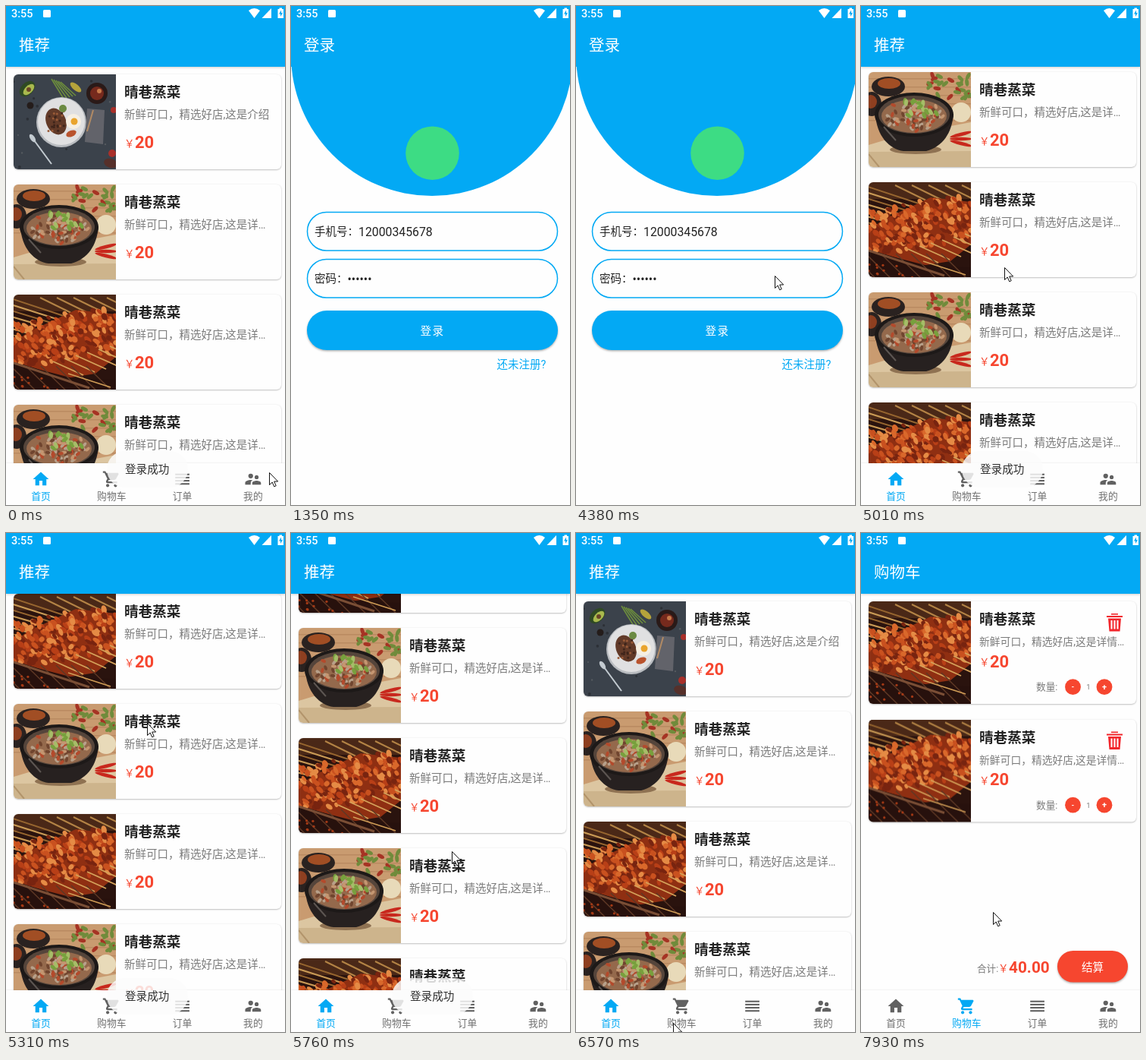
Animation of 368 by 657 pixels, one loop 8000 ms. Source, as an HTML page with a canvas:

```html
<!DOCTYPE html>
<html lang="zh-CN">
<head>
<meta charset="utf-8">
<title>点餐</title>
<style>
html, body { margin: 0; width: 100%; height: 100%; overflow: hidden; background: #fefefe; }
canvas { display: block; width: 100vw; height: 100vh; }
</style>
</head>
<body>
<canvas id="stage"></canvas>
<script>
const W = 368, H = 657, LOOP = 8000;
const BLUE = '#03a9f4', RED = '#f6462f', INK = '#222', GRAY = '#7b7b7b', PAPER = '#fefefe';
const FONT = 'Roboto, "Noto Sans CJK SC", "Noto Sans CJK", sans-serif';
const SHOP = '晴巷蒸菜', PHONE = '12000345678';
const TAU = Math.PI * 2;
const dpr = window.devicePixelRatio || 1;

function makeCanvas(w, h, el = document.createElement('canvas')) {
  el.width = Math.round(w * dpr);
  el.height = Math.round(h * dpr);
  const c = el.getContext('2d');
  c.scale(dpr, dpr);
  return c;
}

const screen = makeCanvas(W, H, document.getElementById('stage'));
const layer = makeCanvas(W, H);
let g = screen;

// ---------- drawing helpers ----------
function rect(x, y, w, h, color) {
  g.fillStyle = color;
  g.fillRect(x, y, w, h);
}

function oval(x, y, rx, ry, color, turn = 0) {
  g.fillStyle = color;
  g.beginPath();
  g.ellipse(x, y, rx, ry, turn, 0, TAU);
  g.fill();
}

const disc = (x, y, r, color) => oval(x, y, r, r, color);

function line(x1, y1, x2, y2, color, width) {
  g.strokeStyle = color;
  g.lineWidth = width;
  g.beginPath();
  g.moveTo(x1, y1);
  g.lineTo(x2, y2);
  g.stroke();
}

function shape(d, color) {
  g.fillStyle = color;
  g.fill(new Path2D(d));
}

function roundPath(x, y, w, h, r) {
  g.beginPath();
  g.roundRect(x, y, w, h, r);
}

function shadowed(alpha, blur, dy, draw) {
  g.save();
  g.shadowColor = `rgba(0,0,0,${alpha})`;
  g.shadowBlur = blur * dpr;
  g.shadowOffsetY = dy * dpr;
  draw();
  g.restore();
}

// y is the visual middle of the line
function text(s, x, y, size, color, { weight = 400, align = 'left', gap = 0 } = {}) {
  g.font = `${weight} ${size}px ${FONT}`;
  g.textAlign = align;
  g.letterSpacing = gap + 'px';
  g.fillStyle = color;
  g.fillText(s, x, y + size * 0.37);
  g.letterSpacing = '0px';
}

function seeded(seed) {
  return () => (seed = (seed * 16807) % 2147483647) / 2147483647;
}

function scatter(n, seed, draw) {
  const rnd = seeded(seed);
  for (let i = 0; i < n; i++) draw(rnd, i);
}

// ---------- dish pictures ----------
function paintPlate() {
  rect(0, 0, 135, 125, '#3b424b');
  scatter(18, 31, r => disc(r() * 135, r() * 125, 1 + r(), r() < 0.5 ? '#2c3036' : '#565b60'));
  oval(18, 19, 8, 12, '#2f4a23', 0.8);
  oval(20, 20, 5, 9, '#a9b94e', 0.8);
  disc(20, 20, 3, '#6a4527');
  disc(22, 41, 4.5, '#241c1a');
  for (let i = 0; i < 5; i++) line(50 + i * 3, 6 + i, 66 + i * 4, 32 - i, '#6d8e3d', 1.6);
  oval(82, 17, 9, 4, '#b5a33b', 0.7);
  disc(110, 25, 14, '#2a1a18');
  disc(110, 25, 9, '#762a1d');
  disc(113, 22, 3, '#c77a4a');
  disc(63, 63, 33, '#b9bcc0');
  disc(63, 62, 31, '#e0e0e1');
  oval(56, 62, 13, 18, '#623a28', -0.4);
  scatter(22, 7, r => disc(46 + r() * 22, 47 + r() * 30, 1.5, r() < 0.5 ? '#9a5b38' : '#3f251b'));
  disc(65, 45, 5, '#6b8a42');
  disc(79, 62, 10, '#f6efe2');
  disc(80, 62, 4.5, '#e9a42d');
  oval(76, 78, 7, 4, '#b9532d', -0.4);
  shape('M97 45L120 47 118 92 94 89Z', '#62636a');
  line(105, 47, 97, 75, '#b18a64', 2);
  line(22, 80, 50, 118, '#c3cbd1', 2);
  oval(25, 84, 3, 6, '#c3cbd1', -0.6);
  disc(132, 47, 4, '#a9302a');
  disc(130, 104, 5, '#a9302a');
  oval(128, 117, 9, 6, '#56302a', 0.3);
}

function paintBowl() {
  rect(0, 0, 135, 125, '#c99b70');
  for (let i = 0; i < 6; i++) rect(0, 8 + i * 11, 135, 1.5, '#b98a61');
  shape('M0 96L40 84 135 66V125H0Z', '#dcc6a1');
  shape('M0 105L135 104V125H0Z', '#cdb48c');
  line(14, 125, 0, 108, '#b2946b', 2);
  oval(26, 19, 22, 13, '#2a2220');
  oval(27, 15, 15, 7, '#a14e24');
  oval(4, 42, 13, 16, '#2a2220');
  oval(3, 39, 8, 9, '#8e3f20');
  scatter(26, 19, r => oval(80 + r() * 55, 4 + r() * 30, 5, 2.5, r() < 0.7 ? '#708b3b' : '#a63324', r() * 3));
  disc(122, 53, 13, '#e8dab9');
  for (let i = 0; i < 3; i++) oval(122, 82 + i * 6, 15, 2.2, '#c8281d', -0.25 + i * 0.25);
  oval(62, 102, 34, 6, '#8f7252');
  shape('M9 55C10 84 28 102 46 104H76C98 98 110 80 112 55Z', '#272120');
  oval(60, 56, 52, 29, '#1d1918');
  oval(60, 56, 47, 25, '#55453b');
  oval(60, 58, 43, 22, '#94694c');
  scatter(75, 5, r => {
    const a = r() * TAU, d = Math.sqrt(r());
    const color = ['#c49671', '#70452f', '#b34a2c', '#b7a08a'][Math.floor(r() * 4)];
    oval(60 + Math.cos(a) * d * 40, 58 + Math.sin(a) * d * 20, 3.5, 2, color, r() * 3);
  });
  scatter(16, 23, r => oval(48 + r() * 42, 38 + r() * 24, 4.5, 2.5, r() < 0.7 ? '#78a03d' : '#a6bd68', r() * 3));
  line(20, 72, 36, 90, '#5d5652', 2);
}

function paintSkewers() {
  rect(0, 0, 135, 135, '#2a130e');
  rect(0, 0, 135, 22, '#4a2817');
  for (let i = 0; i < 11; i++) {
    line(-10, 3 + i * 8, 66, 28 + i * 7, i % 2 ? '#c99a55' : '#96652f', 2);
  }
  for (let i = 0; i < 5; i++) line(35 + i * 22, 4, 80 + i * 22, 26, '#b38345', 2);
  shape('M18 50L82 20 135 26V82L108 104 70 110 0 88V64Z', '#8f2f12');
  scatter(210, 11, r => {
    const x = r() * 135, y = 60 - x * 0.16 + (r() - 0.5) * 60 + 7;
    const color = ['#d9682b', '#b83f17', '#e58b45', '#782410', '#c9511f'][Math.floor(r() * 5)];
    oval(x, y, 3 + r() * 3, 2 + r() * 2, color, 0.4 + r());
  });
  for (let i = 0; i < 6; i++) line(52 + i * 15, 88 - i * 4, 92 + i * 15, 106 - i * 4, '#d4a25a', 1.8);
  shape('M0 90L78 110 135 112V135H0Z', '#27110d');
  for (let i = 0; i < 7; i++) line(i * 20 - 24, 94, i * 20 + 18, 135, '#5e3825', 1.5);
  line(0, 90, 100, 123, '#7a4e35', 3);
  scatter(14, 3, r => disc(r() * 75, 108 + r() * 22, 1.6, '#a53a16'));
  line(72, 104, 128, 122, '#cf9c56', 1.8);
}

function picture(paint) {
  g = makeCanvas(135, 135);
  paint();
  const made = g.canvas;
  g = screen;
  return made;
}

const plate = picture(paintPlate), bowl = picture(paintBowl), skewers = picture(paintSkewers);

// ---------- shared parts ----------
function header(title, x = 17) {
  rect(0, 0, W, 80, BLUE);
  text('3:55', 7, 10, 14.5, '#fff', { weight: 500 });
  roundPath(49, 5, 10, 10, 1.5);
  g.fill();
  shape('M320 6Q327.500 0 335 6L327.500 16Z', '#fff');
  shape('M350 3V16H337.500Z', '#fff');
  shape('M358.500 4H360.500V2.500H364V4H366V16H358.500Z', '#fff');
  shape('M363 5.500L360 10.500H362V14L365 9H363Z', BLUE);
  text(title, x, 51, 20.5, '#fff');
}

const tabs = [
  ['首页', c => shape('M10 20v-6h4v6h5v-8h3L12 3 2 12h3v8z', c)],
  ['购物车', c => {
    shape('M1 2v2h2l3.6 7.6-1.4 2.4q-1 3 1.8 3h12v-2H7.4l1-2h7.200l1.800-1L21 5.400 20 4H5.200l-1-2z', c);
    disc(7, 20, 2, c);
    disc(17, 20, 2, c);
  }],
  ['订单', c => { for (let i = 0; i < 4; i++) rect(3, 5 + i * 4, 18, 2, c); }],
  ['我的', c => {
    disc(9, 8, 3, c);
    disc(16.5, 9.5, 2.5, c);
    shape('M9 13c-2.300 0-7 1.200-7 3.500V19h7v-2.200q0-2.200 2.400-3.500Q10 13 9 13z', c);
    shape('M16.500 14c-1.800 0-5.500.9-5.500 2.700V19h11v-2.300c0-1.800-3.700-2.700-5.500-2.700z', c);
  }]
];

function navBar(active) {
  shadowed(0.12, 2, -0.5, () => rect(0, 602, W, 55, PAPER));
  tabs.forEach(([label, icon], i) => {
    const x = 46 + i * 93.3, color = i === active ? BLUE : '#616161';
    g.save();
    g.translate(x - 12.5, 610.5);
    g.scale(1.04, 1.04);
    icon(color);
    g.restore();
    text(label, x, 645, 12.8, i === active ? BLUE : '#707070', { align: 'center' });
  });
}

function card(y, h, pic) {
  shadowed(0.3, 2, 0.8, () => {
    g.fillStyle = PAPER;
    roundPath(10, y, 353, h, 6);
    g.fill();
  });
  g.save();
  roundPath(10, y, 353, h, 6);
  g.clip();
  g.drawImage(pic, 10, y, 135, 135);
  g.restore();
  text(SHOP, 156, y + 23.5, 18.6, INK, { weight: 700 });
}

function price(y, value, x = 156, size = 22) {
  text('￥', x, y + 2, 13.5, RED);
  text(value, x + 14, y, size, RED, { weight: 700 });
}

function toast(alpha) {
  if (alpha <= 0) return;
  g.save();
  g.globalAlpha = alpha;
  g.fillStyle = 'rgba(252,252,252,.83)';
  roundPath(133, 586, 107, 48, 24);
  g.fill();
  text('登录成功', 157, 610, 14.6, '#303030');
  g.restore();
}

// ---------- pages ----------
function home(t) {
  const scroll = track(scrollKeys, t)[0];
  rect(0, 0, W, H, PAPER);
  for (let i = 0; i < 9; i++) {
    const y = 90 + i * 145 - scroll;
    if (y < -60 || y > 610) continue;
    card(y, 125, i === 0 ? plate : i % 2 ? bowl : skewers);
    text('新鲜可口，精选好店,这是' + (i ? '详…' : '介绍'), 156, y + 53, 14.5, GRAY);
    price(y + 89, '20');
  }
  shadowed(0.2, 3, 1, () => rect(0, 0, W, 80, BLUE));
  header('推荐');
  navBar(0);
  toast(t < 4000 ? 1 : 1 - ramp(t, 6050, 6250));
}

function field(y, label, hint, value) {
  g.strokeStyle = BLUE;
  g.lineWidth = 1.5;
  roundPath(21.5, y + 0.5, 330, 50.5, 25.2);
  g.stroke();
  text(label, 31, y + 26, 14.5, INK);
  text(value || hint, 31 + label.length * 14.5, y + 26, 15.8, value ? INK : '#a2a2a2');
}

function pill(x, y, w, h, color, label, opts) {
  shadowed(0.3, 2.5, 1.5, () => {
    g.fillStyle = color;
    roundPath(x, y, w, h, h / 2);
    g.fill();
  });
  text(label, x + w / 2, y + h / 2 + 0.5, 14.6, '#fff', { align: 'center', ...opts });
}

function account(title, x) {
  rect(0, 0, W, H, PAPER);
  disc(186, 64, 186, BLUE);
  header(title, x);
  disc(186.5, 193.7, 35.3, '#3ddc84');
}

function login() {
  account('登录');
  field(271, '手机号：', '', PHONE);
  field(333, '密码：', '', '••••••');
  pill(21, 401, 331, 52, BLUE, '登录', { gap: 1.3 });
  text('还未注册?', 271.5, 472, 14.5, BLUE);
}

function register() {
  account('手机号注册', 75.5);
  line(19, 50.5, 36, 50.5, '#fff', 1.4);
  line(27.5, 42.5, 19.5, 50.5, '#fff', 1.4);
  line(19.5, 50.5, 27.5, 58.5, '#fff', 1.4);
  field(271, '手机号：', '请输入手机号');
  field(333, '密码：', '请输入密码');
  field(395, '确认密码：', '请输入确认密码');
  pill(21, 463, 331, 52, BLUE, '注册', { gap: 1.3 });
}

function trash(x, y) {
  const red = '#f2262c';
  rect(x + 6, y, 9, 1.6, red);
  rect(x, y + 3, 21, 2, red);
  shape(`M${x + 2} ${y + 6.5}h17l-1.500 17h-14z`, red);
  for (let i = 0; i < 3; i++) rect(x + 5.5 + i * 4, y + 9, 2, 11.5, '#fff');
}

function cart() {
  rect(0, 0, W, H, PAPER);
  shadowed(0.2, 3, 1, () => rect(0, 0, W, 80, BLUE));
  header('购物车');
  for (const y of [90, 245.5]) {
    card(y, 135, skewers);
    trash(324, y + 16);
    text('新鲜可口，精选好店,这是详情…', 156, y + 53, 13.8, GRAY);
    price(y + 78.5, '20');
    text('数量:', 231, y + 112.5, 12.7, GRAY);
    disc(279.5, y + 112.7, 10.4, RED);
    disc(321, y + 112.7, 10.4, RED);
    text('-', 279.5, y + 112.5, 10, '#fff', { weight: 500, align: 'center' });
    text('1', 300, y + 112.5, 9.5, GRAY, { align: 'center' });
    text('+', 321, y + 112.5, 11, '#fff', { weight: 700, align: 'center' });
  }
  text('合计:', 153, 573.5, 12.6, GRAY);
  price(571, '40.00', 181, 20.8);
  pill(259, 550, 93, 41.5, RED, '结算', { weight: 500 });
  navBar(1);
}

function pointer(x, y) {
  g.save();
  g.translate(x + 0.5, y + 0.5);
  g.beginPath();
  const tip = new Path2D('M0 0V16L3.700 12.500 6.200 18.300 8.700 17.200 6.200 11.500H11.200Z');
  g.fillStyle = '#fff';
  g.fill(tip);
  g.strokeStyle = '#111';
  g.lineWidth = 1;
  g.stroke(tip);
  g.restore();
}

// ---------- timing ----------
const ramp = (t, a, b) => Math.min(1, Math.max(0, (t - a) / (b - a)));

// keys: [time, ...values], eased between neighbours
function track(keys, t) {
  let i = 0;
  while (i < keys.length - 2 && t >= keys[i + 1][0]) i++;
  const [a, b] = [keys[i], keys[i + 1]];
  const k = ramp(t, a[0], b[0]), e = k * k * (3 - 2 * k);
  return a.slice(1).map((v, n) => v + (b[n + 1] - v) * e);
}

const scrollKeys = [
  [4840, 0], [5010, 148], [5159, 148], [5160, 300], [5310, 300], [5500, 519],
  [5760, 400], [5910, 400], [6270, 0]
];

const pointerKeys = [
  [1780, 340, 430], [2050, 305, 473], [2300, 305, 473], [2800, 35, 41], [3150, 35, 41],
  [3980, 290, 335], [4260, 290, 335], [4380, 262, 355], [4500, 262, 355], [4620, 222, 428],
  [4700, 222, 428], [4840, 205, 492], [5010, 189, 344], [5159, 189, 344], [5160, 186, 250],
  [5310, 186, 250], [5500, 205, 300], [5760, 212, 419], [5910, 212, 419], [6100, 214, 540],
  [6420, 205, 560], [6570, 128, 645], [6690, 128, 645], [6800, 130, 632], [7390, 122, 630],
  [7510, 122, 630], [7700, 243, 384], [7930, 174, 499]
];

// page, start, fade length
const scenes = [
  [home, 0, 0], [login, 810, 300], [register, 2200, 200], [login, 3100, 220],
  [home, 4640, 120], [cart, 6810, 0]
];

function render(t) {
  let n = scenes.length - 1;
  while (scenes[n][1] > t) n--;
  const [page, start, fade] = scenes[n];
  const mix = fade ? ramp(t, start, start + fade) : 1;
  g = screen;
  if (mix < 1) {
    scenes[n - 1][0](t);
    g = layer;
    page(t);
    g = screen;
    g.globalAlpha = mix;
    g.drawImage(layer.canvas, 0, 0, W, H);
    g.globalAlpha = 1;
  } else {
    page(t);
  }
  if (t < 150) pointer(347, 614);
  else if (t >= 1780) pointer(...track(pointerKeys, t));
}

const begin = performance.now();
function tick() {
  render((performance.now() - begin) % LOOP);
  requestAnimationFrame(tick);
}
tick();
</script>
</body>
</html>
```
